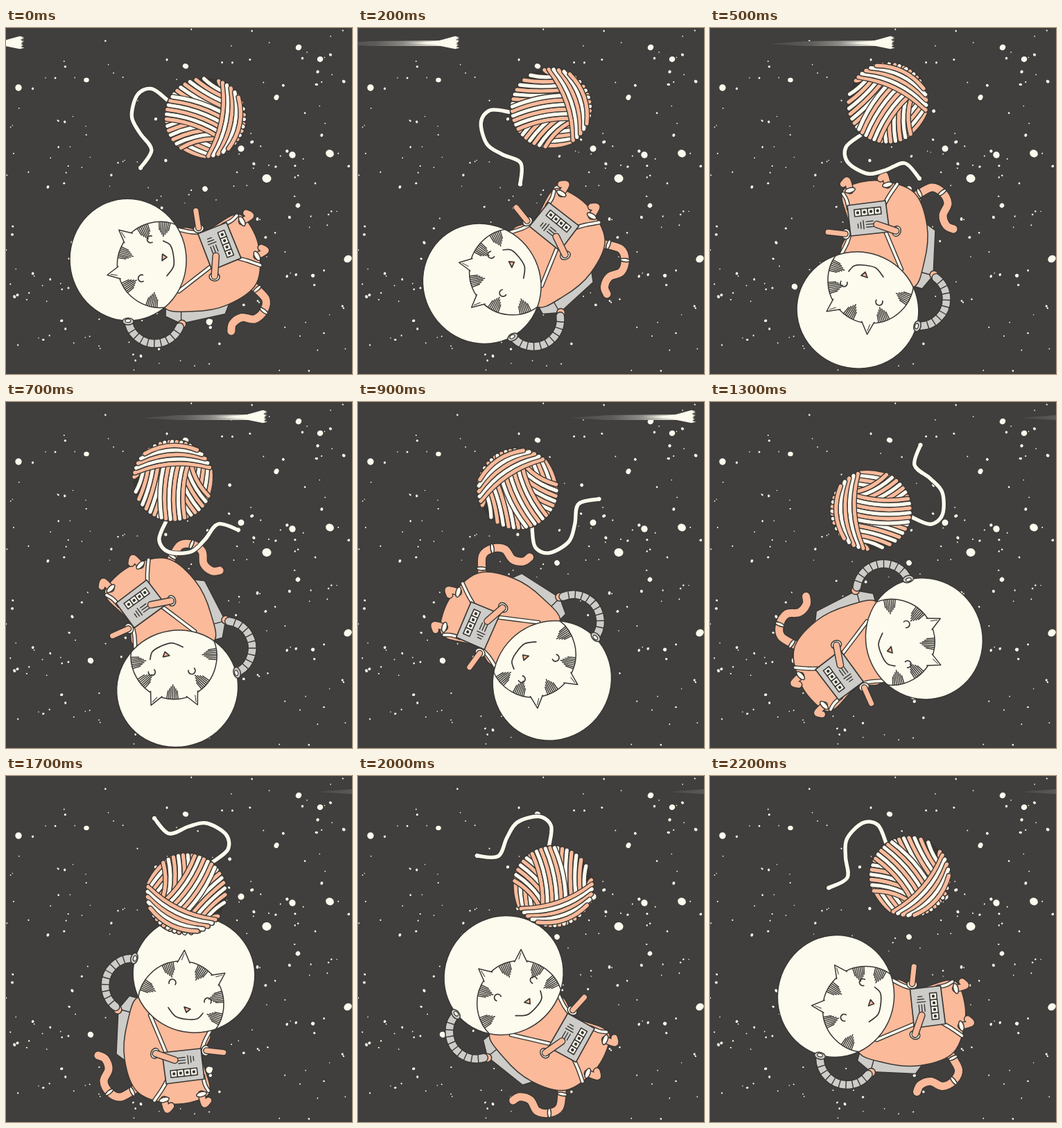
Recreate the animation shown at these times as an HTML page with a canvas. Size 499x499 px, loop 2.3 s.

```html
<!DOCTYPE html>
<html lang="en">
<head>
<meta charset="utf-8">
<title>Space cat</title>
<style>
  html, body { margin: 0; width: 100%; height: 100%; overflow: hidden; background: #403f3d; }
  canvas { display: block; width: 499px; height: 499px; }
</style>
</head>
<body>
<canvas id="stage" width="499" height="499"></canvas>
<script>
const SIZE = 499, STEP = 100, STEPS = 23, UPRIGHT = 17;
const SKY = '#403f3d', CREAM = '#fdfbee', PEACH = '#fbba9a', GREY = '#cdccc8', INK = '#393734';
const RAD = Math.PI / 180;

const canvas = document.getElementById('stage');
let g = canvas.getContext('2d');

function random(seed) {
  return () => (seed = seed * 16807 % 2147483647) / 2147483647;
}

// Smooth curve through points
function curve(p, closed) {
  const n = p.length;
  const at = i => closed ? p[(i + n) % n] : p[Math.max(0, Math.min(n - 1, i))];
  g.beginPath();
  g.moveTo(...p[0]);
  for (let i = 0; i < (closed ? n : n - 1); i++) {
    const [a, b, c, d] = [at(i - 1), at(i), at(i + 1), at(i + 2)];
    g.bezierCurveTo(b[0] + (c[0] - a[0]) / 6, b[1] + (c[1] - a[1]) / 6,
                    c[0] - (d[0] - b[0]) / 6, c[1] - (d[1] - b[1]) / 6, ...c);
  }
  if (closed) g.closePath();
}

function poly(p) {
  g.beginPath();
  p.forEach(q => g.lineTo(...q));
  g.closePath();
}

function oval(x, y, rx, ry = rx, turn = 0) {
  g.beginPath();
  g.ellipse(x, y, rx, ry, turn * RAD, 0, 7);
}

function line(color, width) {
  g.strokeStyle = color;
  g.lineWidth = width;
  g.stroke();
}

function fill(color) {
  g.fillStyle = color;
  g.fill();
}

function paint(color, width = 1.5) {
  fill(color);
  line(INK, width);
}

// Outlined stroke along the current path
function tube(color, width) {
  line(INK, width + 2.8);
  line(color, width);
}

function seg(x1, y1, x2, y2, width = 1.4) {
  g.beginPath();
  g.moveTo(x1, y1);
  g.lineTo(x2, y2);
  line(INK, width);
}

function spin(x, y, turn, draw) {
  g.save();
  g.translate(x, y);
  g.rotate(turn * RAD);
  draw();
  g.restore();
}

// Night sky, drawn once
const bigStars = [[467, 181, 6.5], [376, 217, 6], [413, 183, 5.2], [453, 45, 4.6], [493, 333, 5.2],
  [339, 174, 4.4], [259, 55, 4], [18, 86, 4.4], [116, 75, 4], [122, 373, 4.4], [390, 100, 4],
  [287, 232, 4.2], [293, 424, 4.2], [422, 28, 4], [421, 256, 3.5]];

function makeSky() {
  const sky = document.createElement('canvas');
  sky.width = sky.height = SIZE;
  const main = g, rnd = random(71);
  g = sky.getContext('2d');
  g.fillStyle = SKY;
  g.fillRect(0, 0, SIZE, SIZE);
  const star = (x, y, r) => {
    oval(x, y, r * (.8 + rnd() * .35), r * (.8 + rnd() * .35), rnd() * 180);
    fill(CREAM);
  };
  bigStars.forEach(s => star(...s));
  for (let i = 0; i < 210; i++) star(rnd() * SIZE, rnd() * SIZE, .8 + 1.7 * rnd() ** 2);
  g = main;
  return sky;
}

function comet(step) {
  const x = step < 2 ? 28 + 60 * step
          : step < 5 ? 148 + 40 * (step - 2)
          : Math.min(630, 268 + 55.2 * (step - 5));
  const rnd = random(9);
  spin(x, 21, 0, () => {
    const fade = g.createLinearGradient(-183, 0, -50, 0);
    fade.addColorStop(0, '#4c4a48');
    fade.addColorStop(.45, '#5d5b59');
    fade.addColorStop(.75, '#8b8985');
    fade.addColorStop(1, '#cfcdc4');
    poly([[-183, 2], [-130, -2], [-20, -3], [-20, 5], [-130, 5]]);
    fill(fade);
    // Streaks fanning back from a ragged head
    for (let i = -4; i <= 4; i++) {
      const y = i * 1.9, back = -78 + Math.abs(i) * 11 + rnd() * 8;
      poly([[back, 1 + y * .4], [-8, y - 1.6], [-1 - rnd() * 5, y], [-8, y + 1.6]]);
      fill(CREAM);
    }
  });
}

// Parallel strands across the ball, each as long as its chord
function strands(turn, from, count, bend) {
  spin(0, 0, turn, () => {
    for (let i = 0; i < count; i++) {
      const y = from + i * 6.6, end = y - bend;
      const half = Math.sqrt(Math.max(0, 56 ** 2 - end ** 2));
      g.beginPath();
      g.moveTo(-half, end);
      g.quadraticCurveTo(0, y + bend, half, end);
      line(INK, 8);
      line(i % 2 ? CREAM : PEACH, 5.2);
    }
  });
}

function yarn(step) {
  spin(258, 139, -15 * (step - UPRIGHT), () => {
    g.translate(2, 31);
    curve([[38, -46], [60, -64], [57, -86], [29, -102], [3, -97], [-25, -87], [-46, -109]]);
    line(INK, 7.5);
    line(CREAM, 5.4);
    oval(-46, -109, 3);
    fill(CREAM);
    oval(0, 0, 57);
    fill(INK);
    strands(-48, -54, 17, -4);
    strands(100, -8, 7, -9);
    strands(-52, -16, 6, 8);
    strands(26, 24, 5, 9);
  });
}

function tail() {
  curve([[187, 451], [165, 463], [149, 456], [141, 440], [148, 423], [143, 408], [133, 403]]);
  tube(PEACH, 11);
  oval(149, 456, 2.5, 7, 52);
  paint(CREAM);
  oval(182, 455, 2.5, 7, -25);
  paint(CREAM);
}

function pack() {
  poly([[162, 336], [178, 317], [196, 322], [184, 410], [174, 412], [159, 401]]);
  paint(GREY);
  seg(162, 336, 184, 342);
  oval(161, 337, 6);
  paint(PEACH);
  g.beginPath();
  g.arc(182, 302, 39, -90 * RAD, 128 * RAD, true);
  tube(GREY, 10.5);
  for (let a = 140; a < 265; a += 14)
    spin(182, 302, a, () => seg(33.5, 0, 44.5, 0));
}

function body() {
  curve([[194, 318], [175, 356], [171, 408], [190, 456], [240, 473], [284, 465],
         [294, 448], [283, 405], [294, 371], [250, 350]], true);
  paint(PEACH);
  curve([[208, 345], [219, 371], [232, 402]]);
  tube(CREAM, 3.6);
  curve([[233, 438], [225, 452], [214, 468]]);
  tube(CREAM, 3.6);
  curve([[294, 368], [286, 384], [281, 401]]);
  tube(CREAM, 3.6);
  curve([[284, 432], [287, 445], [292, 454]]);
  tube(CREAM, 3.6);
}

function foot(x, y) {
  curve([[x, y], [x + 4, y + 14], [x + 10, y + 9]]);
  tube(PEACH, 8.5);
  oval(x, y, 3.5, 7.5, 75);
  paint(CREAM);
}

function arm(x, y, length, turn, width) {
  spin(x, y, turn, () => {
    oval(0, 0, 6, 7.5);
    paint(CREAM);
    g.beginPath();
    g.moveTo(1, 0);
    g.lineTo(length, 0);
    tube(PEACH, width);
  });
}

function panel() {
  poly([[225, 399], [281, 393], [286, 437], [231, 444]]);
  paint(GREY, 1.7);
  spin(237, 425, -6, () => {
    for (let i = 0; i < 4; i++) {
      g.beginPath();
      g.rect(i * 9.6, 0, 9.6, 10);
      paint(CREAM, 1.6);
      oval(i * 9.6 + 4.8, 5, 2.2);
      fill(INK);
    }
    for (let i = 0; i < 3; i++) {
      seg(9 + i * 2, -17 + i * 4, 23, -17 + i * 4);
      seg(27 + i * 4, -19 + i, 27 + i * 4, -7 - i * 2);
    }
  });
}

// Wedge of fur lines pointing inwards from the rim of the face
function hatch(angle, r) {
  spin(0, 0, angle, () => {
    for (let i = -3; i <= 3; i++)
      seg(r - Math.abs(i) * .3, i * 2.7, r - 21 + Math.abs(i) * 3, i * 2.2, 1.5);
  });
}

function ear(angle, r) {
  spin(0, 0, angle, () => {
    g.beginPath();
    g.moveTo(r - 2, -9);
    g.lineTo(r + 16, 0);
    g.lineTo(r - 2, 9);
    paint(CREAM);
    seg(r + 2, -3, r + 11, 0, 1);
  });
}

function head() {
  oval(271, 286, 88, 84, 10);
  paint(CREAM);
  g.save();
  g.clip();
  g.translate(252, 329);
  oval(0, 0, 62);
  line(INK, 1.5);
  [207, 252, 302, 350, 21].forEach(a => hatch(a, 62));
  ear(-86, 62);
  ear(-35, 62);
  g.restore();

  for (const [x, y] of [[240, 298], [291, 325]]) {
    g.beginPath();
    g.arc(x, y, 5, 165 * RAD, 395 * RAD);
    line(INK, 1.7);
  }
  curve([[234, 334], [245, 347], [262, 351], [276, 350], [284, 342]]);
  line(INK, 1.7);
  poly([[257, 333], [266, 336], [260, 341]]);
  paint(PEACH, 1.7);

  // Hose socket
  oval(185, 263, 5, 8, 15);
  paint(GREY);
  oval(186, 263, 2.5, 4, 15);
  paint(CREAM, 1.2);
}

function cat(step) {
  const k = step - UPRIGHT;
  spin(242, 346.5, -(k > 0 ? 18 : 15) * k, () => {
    g.translate(-242, -346.5);
    tail();
    pack();
    body();
    foot(228, 467);
    foot(282, 459);
    head();
    panel();
    arm(215, 400, 30, 19, 8);
    arm(288, 396, 26, 6, 7);
  });
}

const sky = makeSky();

function frame() {
  const step = Math.floor(performance.now() / STEP) % STEPS;
  g.lineCap = g.lineJoin = 'round';
  g.drawImage(sky, 0, 0);
  comet(step);
  cat(step);
  yarn(step);
  requestAnimationFrame(frame);
}
frame();
</script>
</body>
</html>
```
